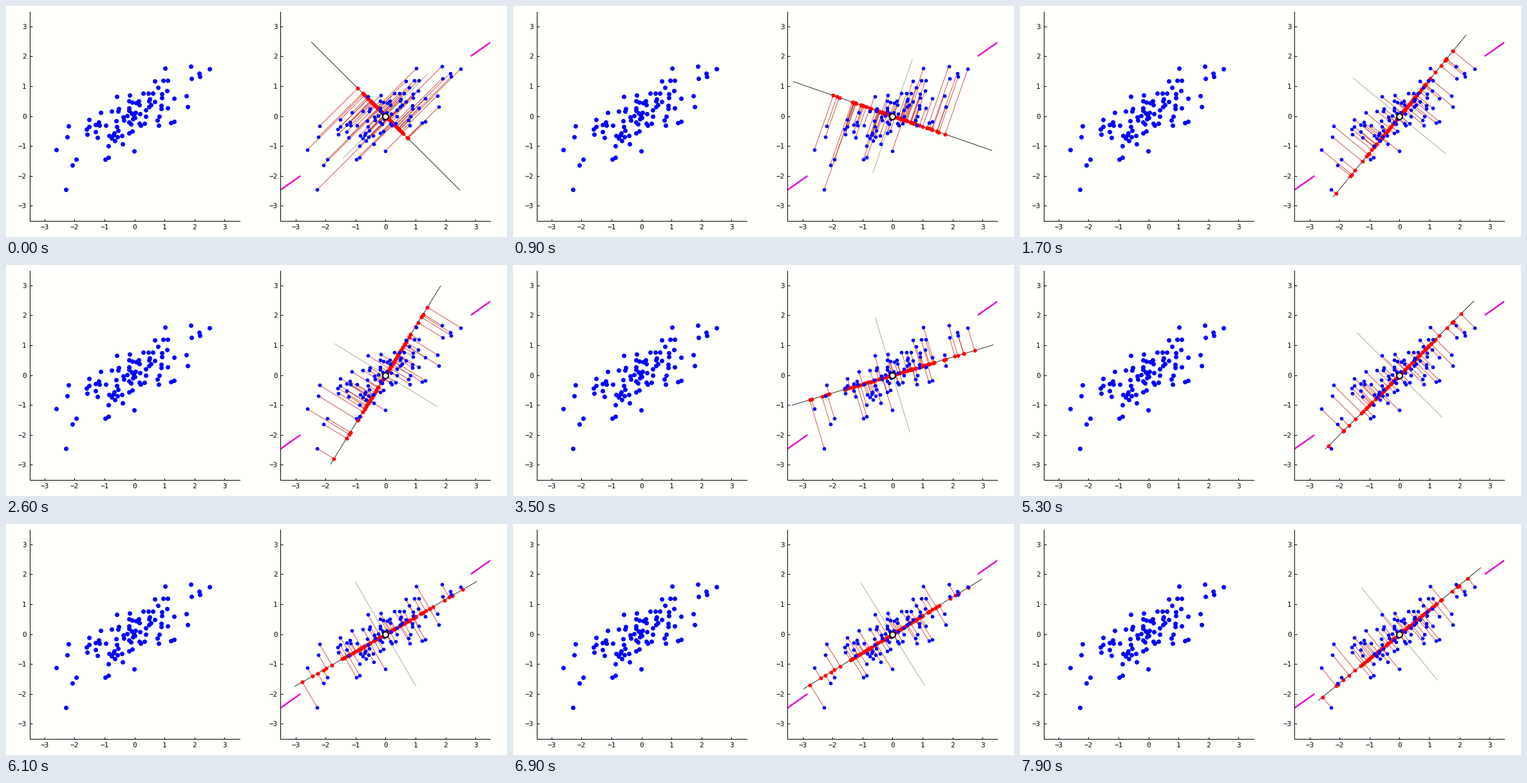
Animation, 778 px wide and 360 px high, one loop 8 s. Source, as a matplotlib script:

```python
import numpy as np
import matplotlib.pyplot as plt
from matplotlib.animation import FuncAnimation
from matplotlib.collections import LineCollection

W, H, DPI = 778, 360, 100
FRAMES, INTERVAL = 80, 100
PX = 72 / DPI           # one pixel in points
REST, START = 35.2, -45.0
PULL, DRAG = 1.495, 0.93
COUNT = 94
BG, BLUE, RED = "#fffffc", "#0000ff", "#ff0000"


def direction(deg):
    a = np.radians(deg)
    return np.array([np.cos(a), np.sin(a)])


AXIS, CROSS = direction(REST), direction(REST + 90)


def cloud():
    """A few outliers around a seeded, elongated normal cloud."""
    pts = [(-2.61, -1.13), (-2.28, -2.46), (-2.24, -0.7), (-2.2, -0.34),
           (-2.08, -1.64), (-1.94, -1.45), (2.51, 1.58), (2.19, 1.32),
           (2.15, 1.43), (1.87, 1.66), (1.89, 1.26), (1.03, 1.6),
           (1.72, 0.68), (1.32, -0.18), (-0.6, 0.66), (-0.02, -1.18)]
    rng = np.random.default_rng(4)
    while len(pts) < COUNT:
        t, s = rng.normal(0, (1.1, 0.42))
        p = t * AXIS + s * CROSS
        gap = np.hypot(*(np.array(pts) - p).T).min()
        if abs(t) < 1.75 and abs(s) < 0.9 and gap > 0.07:
            pts.append(p)
    return np.array(pts)


def swing():
    """Line angle per frame: a damped pendulum around the main axis."""
    angles, d, v = [], START - REST, 0.0
    for _ in range(FRAMES):
        angles.append(REST + d)
        v = DRAG * v - PULL * np.sin(np.radians(2 * d))
        d += v
    return angles


def panel(left):
    ax = fig.add_axes([left / W, 25.5 / H, 326 / W, 326 / H], facecolor="none")
    ax.set(xlim=(-3.5, 3.5), ylim=(-3.5, 3.5))
    ticks = range(-3, 4)
    names = [str(t).replace("-", "\u2212") for t in ticks]
    ax.set_xticks(ticks, names)
    ax.set_yticks(ticks, names)
    ax.tick_params(direction="in", length=3.5 * PX, width=PX, pad=5 * PX,
                   labelsize=11 * PX, labelfontfamily="DejaVu Sans Mono")
    ax.spines[["top", "right"]].set_visible(False)
    ax.spines[["left", "bottom"]].set_linewidth(PX)
    return ax


def dots(ax, xy, color, size, z):
    return ax.plot(*xy.T, "o", color=color, ms=size * PX, mew=0, zorder=z)[0]


def line(ax, color, width, z, ends=np.zeros((2, 2))):
    return ax.plot(*ends.T, color=color, lw=width * PX, zorder=z)[0]


fig = plt.figure(figsize=(W / DPI, H / DPI), dpi=DPI, facecolor=BG)
pts = cloud()
angles = swing()

dots(panel(36.5), pts, BLUE, 7, 3)

ax = panel(426.5)
for s in (-1, 1):
    line(ax, "#e800d0", 2.4, 1, np.outer([3.5 * s, 5 * s], AXIS))

normal = line(ax, "#909080", 0.7, 1.5)
main = line(ax, "black", 0.8, 2)
links = LineCollection([], colors="#c02818", linewidths=0.75 * PX, zorder=2.5)
ax.add_collection(links, autolim=False)
shadows = dots(ax, pts, RED, 6, 3)
dots(ax, pts, BLUE, 5.7, 4)
ax.plot(0, 0, "o", ms=9 * PX, mfc=BG, mec="black", mew=2 * PX, zorder=5)


def draw(i):
    u, n = direction(angles[i]), direction(angles[i] + 90)
    foot = np.outer(pts @ u, u)
    main.set_data(*np.outer([-3.5, 3.5], u).T)
    normal.set_data(*np.outer([-2, 2], n).T)
    links.set_segments(np.stack([pts, foot], axis=1))
    shadows.set_data(*foot.T)
    return main, normal, links, shadows


anim = FuncAnimation(fig, draw, frames=FRAMES, interval=INTERVAL,
                     repeat=True, repeat_delay=0)
plt.show()
```
